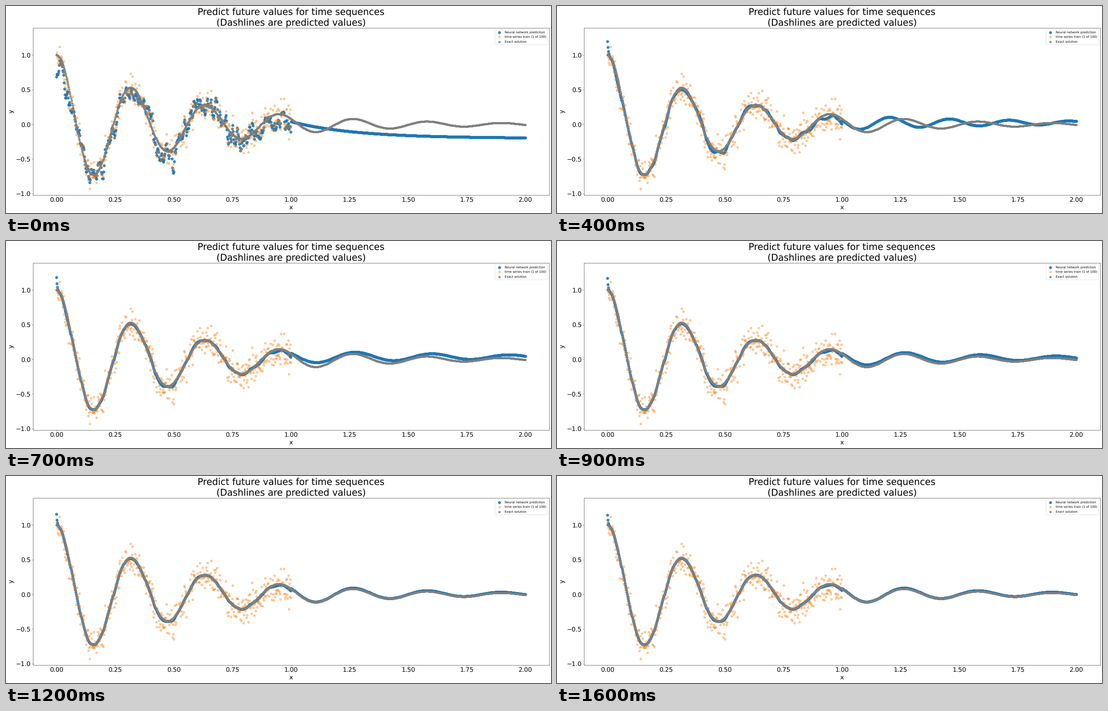
A matplotlib script for the animation above (1.7 s loop, 1212 px wide and 462 px high).

```python
import numpy as np
import matplotlib.pyplot as plt
from matplotlib.animation import FuncAnimation

W, H, DPI = 1212, 462, 48
FRAMES, INTERVAL = 17, 100
K = 1.028  # point scale of fonts, lines and markers

plt.rcParams.update({
    "font.family": "DejaVu Sans",
    "font.size": 10 * K,
    "text.hinting": "none",
    "lines.linewidth": 1.5 * K,
    "axes.linewidth": 0.8 * K,
    "axes.titlepad": 6 * K,
    "axes.labelpad": 4 * K,
    "legend.fontsize": 10 * K,
    "legend.labelspacing": 0.56,
})
for axis in ("xtick", "ytick"):
    plt.rcParams.update({
        f"{axis}.labelsize": 20 * K,
        f"{axis}.major.size": 3.5 * K,
        f"{axis}.major.width": 0.8 * K,
        f"{axis}.major.pad": 3.5 * K,
    })

# Damped oscillator released from rest
N, TRAIN = 1000, 500
DAMP, OMEGA0 = 2, 20
OMEGA = np.sqrt(OMEGA0 ** 2 - DAMP ** 2)
x = np.linspace(0, 2, N)
exact = np.exp(-DAMP * x) * (np.cos(OMEGA * x)
                             + DAMP / OMEGA * np.sin(OMEGA * x))

rng = np.random.default_rng(7)
noise = np.clip(rng.normal(0, 0.12, TRAIN), -0.31, 0.31)
train = exact[:TRAIN] + noise
samples = np.arange(TRAIN)
u = x[TRAIN:] - 1


def smooth(values, sigma):
    t = np.arange(-20, 21)
    kernel = np.exp(-0.5 * (t / sigma) ** 2)
    padded = np.pad(values, 20, mode="edge")
    return np.convolve(padded, kernel / kernel.sum(), mode="valid")


def fitted(frame):
    """Network follows the noise at first, then settles on the curve."""
    gain = 0.2 + 1.6 * np.exp(-frame / 5)
    follow = gain * smooth(noise, 2.5 + min(frame, 4) / 2)
    rough = 0.7 * np.exp(-frame) * smooth(noise, 0.8)
    start = 0.14 + 0.16 * np.exp(-frame / 6) - 0.6 * np.exp(-frame)
    tau = 1.5 + 3.5 * np.exp(-frame / 2)
    return exact[:TRAIN] + follow + rough + start * np.exp(-samples / tau)


def future(frame):
    """A flat guess first, then a wave that tunes itself to the curve."""
    def key(*values):
        return np.interp(frame, (4, 7, 11), values)

    level = np.interp(frame, (0, 2, 4, 7, 11),
                      (-0.2, 0.065, 0.025, 0.038, 0.006))
    flat = np.clip(2 - frame / 2, 0, 1)
    relax = flat * (0.04 - level) * np.exp(-(3.6 + 4 * frame) * u)
    wave = ((1 - flat) * key(0.105, 0.095, 0.14)
            * np.exp(-key(1.45, 1.25, 1.85) * u)
            * np.cos(key(24.7, 19.15, OMEGA) * (u - key(0.205, 0.276, 0.268))))
    return level + relax + wave


def predict(frame):
    return np.concatenate([fitted(frame), future(frame)])


fig = plt.figure(figsize=(W / DPI, H / DPI), dpi=DPI, facecolor="white")
left, right, top, bottom = 60, 1207.5, 49, 421.8
zero, unit = 264, 154.5  # pixel row of y = 0 and pixels per unit
ax = fig.add_axes([left / W, 1 - bottom / H,
                   (right - left) / W, (bottom - top) / H])
ax.set_xlim(-0.1, 2.1)
ax.set_ylim((zero - bottom) / unit, (zero - top) / unit)
ax.set_xticks(np.arange(0, 2.01, 0.25))
ax.set_yticks(np.arange(-1, 1.01, 0.5))
ax.set_title("Predict future values for time sequences\n"
             "(Dashlines are predicted values)", fontsize=30 * K)
ax.set_xlabel("x", fontsize=20 * K)
ax.set_ylabel("y", fontsize=20 * K)


def dots(xs, ys, size, color, alpha, label):
    return ax.scatter(xs, ys, s=size * K * K, color=color, alpha=alpha,
                      label=label)


prediction = dots(x, predict(0), 70, "tab:blue", 0.88,
                  "Neural network prediction")
dots(x[:TRAIN], train, 50, "tab:orange", 0.4, "time series train (1 of 100)")
dots(x, exact, 40, "gray", 0.88, "Exact solution")
ax.legend(loc="upper right")


def update(frame):
    prediction.set_offsets(np.column_stack([x, predict(frame)]))
    return [prediction]


anim = FuncAnimation(fig, update, frames=FRAMES, interval=INTERVAL,
                     repeat=True, repeat_delay=0, blit=False)
plt.show()
```
